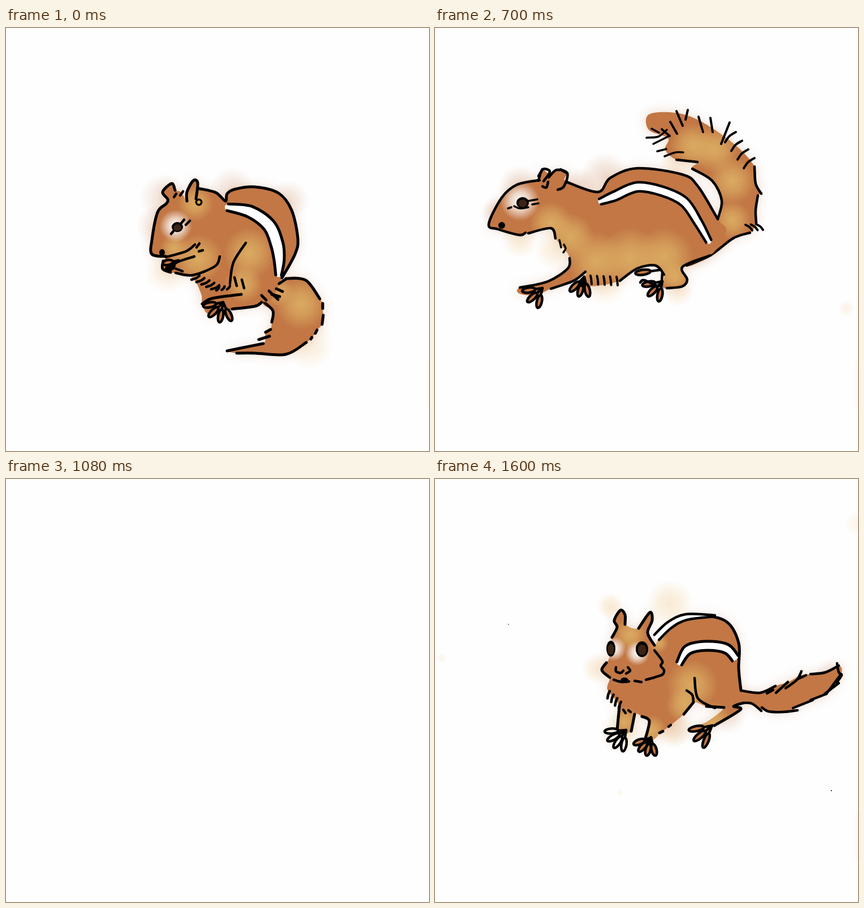
Recreate the animation shown at these times as an HTML page with a canvas. Size 748 by 748 pixels, loop 1.8 s.

```html
<!DOCTYPE html>
<html lang="en">
<head>
<meta charset="utf-8">
<title>Chipmunk</title>
<style>
html, body { margin: 0; width: 100%; height: 100%; overflow: hidden; background: #fefefe; }
canvas { display: block; width: 100vw; height: 100vh; }
</style>
</head>
<body>
<canvas id="stage" width="748" height="748"></canvas>
<script>
const ctx = document.getElementById('stage').getContext('2d');
const FUR = '194,119,69', TAN = '221,176,100', CREAM = '244,214,170', WHITE = '255,255,255';
const PALE = '#fbf0e2';

const points = s => s.trim().split(/\s+/).map(p => p.split(',').map(Number));

// Smooth curve through every point
function spline(p, closed) {
  const n = p.length, path = new Path2D();
  const at = i => closed ? p[(i + n) % n] : p[Math.max(0, Math.min(n - 1, i))];
  path.moveTo(...p[0]);
  for (let i = 0; i < (closed ? n : n - 1); i++) {
    const [a, b, c, d] = [at(i - 1), at(i), at(i + 1), at(i + 2)];
    path.bezierCurveTo(b[0] + (c[0] - a[0]) / 6, b[1] + (c[1] - a[1]) / 6,
      c[0] - (d[0] - b[0]) / 6, c[1] - (d[1] - b[1]) / 6, c[0], c[1]);
  }
  return path;
}

function pen(width) {
  ctx.lineWidth = width;
  ctx.strokeStyle = '#000';
}

function ink(width, ...strokes) {
  pen(width);
  for (const s of strokes) ctx.stroke(spline(points(s)));
}

// Soft airbrush spots: x,y,radius
function glow(rgb, alpha, spots) {
  for (const [x, y, r] of points(spots)) {
    const g = ctx.createRadialGradient(x, y, 0, x, y, r);
    g.addColorStop(0, `rgba(${rgb},${alpha})`);
    g.addColorStop(.45, `rgba(${rgb},${alpha * .68})`);
    g.addColorStop(1, `rgba(${rgb},0)`);
    ctx.fillStyle = g;
    ctx.fillRect(x - r, y - r, 2 * r, 2 * r);
  }
}

// Furry shape; its outline is inked along each part between bars
function shape(width, outline, tan, white) {
  const path = spline(points(outline.replaceAll('|', ' ')), true);
  ctx.save();
  ctx.fillStyle = `rgb(${FUR})`;
  ctx.shadowColor = `rgba(${FUR},.3)`;
  ctx.shadowBlur = 20;
  ctx.fill(path);
  ctx.restore();
  ctx.save();
  ctx.clip(path);
  if (tan) glow(TAN, .9, tan);
  if (white) glow(WHITE, 1, white);
  ctx.restore();
  ink(width, ...outline.split('|'));
}

// White band along a centre line: x,y,half width
function stripe(width, centre) {
  const p = points(centre), sides = [[], []];
  p.forEach(([x, y, w], i) => {
    const a = p[Math.max(0, i - 1)], b = p[Math.min(p.length - 1, i + 1)];
    const t = Math.atan2(b[1] - a[1], b[0] - a[0]);
    sides[0].push([x + w * Math.sin(t), y - w * Math.cos(t)]);
    sides[1].push([x - w * Math.sin(t), y + w * Math.cos(t)]);
  });
  ctx.fillStyle = '#fff';
  ctx.fill(spline([...sides[0], ...sides[1].slice().reverse()], true));
  pen(width);
  for (const s of sides) ctx.stroke(spline(s));
}

// Fan of toe loops
function paw(x, y, angle, len, n, spread, fill = `rgb(${FUR})`) {
  pen(4.5);
  ctx.fillStyle = fill;
  for (let i = 0; i < n; i++) {
    const a = angle + (i - (n - 1) / 2) * spread;
    ctx.beginPath();
    ctx.ellipse(x + Math.cos(a) * len * .68, y + Math.sin(a) * len * .68, len * .32, 4.5, a, 0, 7);
    ctx.fill();
    ctx.moveTo(x, y);
    ctx.lineTo(x + Math.cos(a) * len * .36, y + Math.sin(a) * len * .36);
    ctx.stroke();
  }
}

// Row of n hairs from (x0,y0) to (x1,y1), each reaching by (dx,dy)
function hairs(width, n, x0, y0, x1, y1, dx, dy) {
  pen(width);
  for (let i = 0; i < n; i++) {
    const k = i / (n - 1), x = x0 + (x1 - x0) * k, y = y0 + (y1 - y0) * k;
    ctx.stroke(spline([[x, y], [x + dx * .6, y + dy * .4], [x + dx, y + dy]]));
  }
}

function dot(x, y, rx, ry = rx, color = '#000') {
  ctx.fillStyle = color;
  ctx.beginPath();
  ctx.ellipse(x, y, rx, ry, 0, 0, 7);
  ctx.fill();
}

function eye(x, y, rx, ry) {
  dot(x, y, rx, ry);
  dot(x, y + 1, rx * .68, ry * .68, '#3b2415');
}

function smudge() {
  for (let y = 596; y < 680; y += 12) glow(CREAM, .14, `749,${y},10`);
}

function nibble() {
  glow(FUR, .2, '278,300,42 268,350,38 400,285,40 500,305,36');
  glow(CREAM, .4, '285,430,40 535,560,45');
  shape(5, `495,443 530,446 555,479 | 560,487 560,496 | 561,508 559,524 | 550,534 547,540 | 541,547 539,550
    | 531,556 495,577 440,575 408,575 | 391,571 415,566 455,558 | 459,538 468,533 | 470,520 472,500 455,484`,
    '522,488,46 480,465,28');
  shape(5, `299,287 293,275 277,290 286,303 283,311 268,326 258,375 258,400 283,404 | 278,412 277,426 291,432
    | 328,440 | 345,470 | 347,488 | 358,506 | 390,506 | 400,497 440,492 452,485 | 470,480
    | 488,442 511,400 516,372 505,322 482,292 440,281 405,285 391,293 388,306 371,291 342,284
    | 336,302 339,274 331,270 320,290 320,306 | 309,290`,
    '335,310,32 340,408,44 430,398,46 298,390,26 420,452,34', '300,350,29');
  stripe(5, '392,317,6 432,325,10 465,349,11 479,382,11 483,410,9 482,437,5');
  paw(305, 411, 2.7, 28, 2, .5);
  paw(384, 485, 2.05, 36, 4, .6);
  ink(4.5, '301,293 297,299', '313,289 308,296', '283,405 318,395 334,383', '333,404 303,414 286,427', '296,424 312,430',
    '300,433 330,437 370,421 378,404', '310,345 315,339', '318,348 325,341', '292,364 297,358', '337,388 342,381', '341,395 348,393',
    '424,380 402,415 396,452', '404,441 408,456', '417,445 421,460');
  hairs(4.5, 5, 328, 445, 363, 462, 14, -7);
  hairs(4.5, 3, 372, 464, 391, 462, 5, -6);
  ink(5, '416,471 365,478 347,488', '452,473 460,481', '465,465 481,480', '470,471 484,475', '478,461 489,466', '483,452 495,444', '447,551 466,545');
  dot(276, 397, 5, 6);
  eye(303, 352, 10, 9);
  dot(341, 308, 6.5);
  dot(341, 308, 3, 3, '#d7a53c');
  smudge();
}

function sitUp() {
  glow(FUR, .22, '255,300,40 235,322,26 300,262,36 385,265,32 515,330,34 500,540,40');
  glow(CREAM, .4, '325,390,52 345,440,32 400,550,32');
  shape(5, `490,454 515,442 536,449 | 544,455 550,480 522,524 | 513,531 495,543 458,545 | 446,547 420,545 395,540
    | 361,544 378,533 395,527 | 441,514 | 454,493 466,480 458,462 438,459`);
  shape(5.5, `326,262 290,272 262,294 240,323 246,347 272,353 300,357 | 320,370 | 336,385 | 338,402 | 325,420
    | 338,440 360,452 390,482 408,468 438,459 | 464,466
    | 490,455 514,405 521,345 508,305 482,286 455,280 425,284 402,293 366,265 | 368,243 345,245 | 328,248 326,258`,
    '345,350,52 385,300,34 402,385,46 405,435,42 335,330,36', '295,302,31 322,303,22');
  stripe(5, '403,293,2 432,313,8 452,340,9 454,385,8 451,420,7 447,445,6');
  stripe(5, '485,289,3 504,322,10 512,360,9 505,405,8 485,455,5');
  paw(352, 414, 2.95, 38, 3, .42);
  ink(5, '340,275 362,266 372,248 350,250 334,274', '324,262 322,250 340,245 370,245', '329,272 337,257', '329,260 337,249',
    '340,391 342,402 360,417 354,423', '356,424 361,432 370,432', '357,434 345,431 338,440', '408,331 382,360 367,395 380,456',
    '377,528 400,522 425,519', '388,542 396,533', '415,512 441,517', '432,505 456,507', '448,505 466,496');
  ink(4.5, '276,305 283,305', '305,299 311,302', '328,293 320,293 322,298 329,300', '304,361 318,361', '313,370 321,364', '327,379 335,377', '335,383 339,388',
    '379,347 389,345', '371,354 378,358 385,356');
  hairs(4.5, 3, 361, 367, 361, 388, 12, -4);
  dot(282, 352, 6, 5);
  eye(294, 301, 13, 11);
  dot(295, 297, 2, 2, '#866');
  dot(610, 357, 1);
  dot(669, 485, 1);
  smudge();
}

function crouch() {
  glow(FUR, .24, '300,262,42 150,280,38 108,325,26 255,280,34');
  glow(CREAM, .45, '150,375,32 215,390,40 430,465,28 430,240,34 300,450,40');
  glow(CREAM, .3, '728,496,15');
  shape(4.5, `500,338 507,305 490,270 455,249 | 464,237 427,233 | 407,215 | 412,195 | 378,180 | 378,153 | 425,150
    | 470,165 | 530,206 | 565,245 567,275 577,293 | 571,296 567,322 568,345 | 557,362 527,372 487,402 445,420 | 450,370`,
    '455,208,40 495,215,42 525,270,42 525,340,34');
  shape(4.5, `185,269 145,277 118,300 95,347 112,356 149,366 160,362 | 165,363 205,354 213,372 | 230,392
    | 238,407 235,425 200,448 150,459 | 150,470 | 180,472 | 205,461 245,447 266,431 | 270,456
    | 327,447 358,425 390,420 405,436 | 402,458 | 410,460 437,457 446,445 438,422 487,402 | 515,360
    | 500,338 465,280 437,259 358,248 310,265 288,290 232,272 | 234,257 222,250 | 203,258 | 190,250 183,262`,
    '205,345,38 240,370,42 285,412,52 345,408,56 405,405,52 425,440,28', '150,306,35');
  stripe(4.5, '292,307,5 318,297,8 357,281,8 400,288,8 440,307,8 465,343,7 484,377,5');
  paw(190, 460, 2.4, 36, 3, .6);
  paw(264, 440, 1.85, 36, 3, .5);
  paw(402, 448, 2.35, 36, 3, .6);
  paw(396, 428, 3, 42, 1, 0);
  ink(4.5, '217,286 228,280 234,257 215,251 201,264', '183,270 190,250 203,254 192,271', '190,280 197,282 200,272', '402,434 397,456 370,446 363,450');
  ink(3.5, '129,319 135,317', '140,315 150,319 165,317', '164,306 181,303', '172,312 183,310', '220,375 223,388', '228,383 231,390 227,397');
  hairs(4, 5, 275, 438, 321, 440, 2, 15);
  ink(4, '427,147 438,173', '447,145 443,162', '466,157 474,184', '487,159 491,184', '521,167 506,205', '416,166 428,187', '401,179 415,191');
  hairs(4, 4, 532, 184, 565, 230, -19, 18);
  hairs(4, 3, 568, 347, 549, 348, 12, 10);
  ink(3.5, '383,178 396,185', '374,194 395,192 410,180', '386,205 412,192', '393,218 409,214', '406,227 425,220 439,220');
  dot(118, 349, 6);
  dot(262, 453, 6);
  eye(155, 309, 11, 10);
  smudge();
}

function leap() {
  glow(CREAM, .4, '300,240,36 350,236,34 420,215,40 50,385,36 100,405,40 150,450,28');
  glow(FUR, .13, '215,245,28 110,243,26');
  glow(CREAM, .25, '748,78,24 327,555,6');
  shape(4.5, '205,392 219,425 213,446 204,440 196,405');
  shape(5, `-6,246 | 12,243 62,235 110,248 170,272 235,257 | 260,256 290,247 334,246 | 346,244 350,244
    | 365,243 400,246 440,242 453,231 | 466,238 | 437,270 | 407,290 387,293 | 391,297 340,291 305,298 | 291,300 274,297
    | 266,296 232,299 212,313 206,348 216,350 225,345 232,376 257,414 | 262,425 | 240,430
    | 222,402 206,380 197,405 155,424 115,408 85,371 | 86,377 40,370 2,364 | -6,364`,
    '140,380,54 100,360,36 40,352,34 300,262,34 345,262,36 390,262,30');
  stripe(5, '-5,265,7 60,255,7 100,263,7 145,284,5 188,288,3');
  paw(240, 412, 1.2, 32, 3, .42);
  ink(5, '226,267 249,255', '466,238 445,254 408,266', '437,270 395,283 367,283', '80,364 91,367');
  ink(3.5, '68,320 78,319', '67,333 89,333', '76,343 99,343', '75,349 93,353');
  dot(209, 436, 7, 11);
  smudge();
}

function run() {
  glow(FUR, .22, '505,245,36 610,245,36 380,260,32 675,270,32 690,385,30');
  glow(CREAM, .5, '400,340,28 435,210,28 470,400,38 610,415,36');
  glow(CREAM, .2, '705,612,30 735,612,30 748,78,24 327,555,6');
  shape(6, '752,261 728,267 704,288 | 699,299 722,325 | 720,317 738,326 | 737,319 752,323', '735,288,30');
  shape(6, `452,238 408,243 367,280 352,295 362,307 370,300 | 366,305 375,321 398,314 | 386,325 429,330 433,350 446,372
    | 465,385 | 486,400 520,397 558,360 | 570,366 | 580,373 615,388 640,390 | 632,408
    | 656,404 670,392 699,370 684,360 700,335 687,296 | 706,287 670,272 625,253 | 612,249 609,248
    | 600,243 580,235 530,245 498,268 480,264 | 481,242 465,230 456,242`,
    '550,345,44 600,342,50 650,350,42 525,370,34 400,312,34', '405,278,24 430,275,26 447,268,14');
  stripe(5, '498,281,6 530,270,6 570,263,8 620,275,8 676,299,6');
  paw(436, 390, 2.65, 42, 3, .5, PALE);
  paw(484, 392, 2.05, 32, 3, .5, PALE);
  paw(632, 407, 2.4, 44, 3, .6, PALE);
  ink(5, '480,264 471,266 475,276', '452,257 456,242', '448,274 449,275', '401,279 406,283', '429,281 435,275', '447,363 460,380 486,388', '455,372 466,384',
    '400,392 440,388 486,388', '558,360 559,371', '545,370 552,374', '574,360 569,374', '641,392 630,408', '640,410 655,407 660,414 642,417', '652,374 674,369');
  hairs(5, 4, 616, 377, 645, 375, 12, 8);
  dot(427, 234, 7, 5);
  eye(418, 279, 12, 10);
  dot(507, 136, 1);
  smudge();
}

function lookUp() {
  glow(CREAM, .5, '415,220,42 310,225,24 288,335,28 420,440,36 330,450,40');
  glow(FUR, .15, '425,440,34 700,345,28 520,420,32');
  glow(CREAM, .25, '748,78,24 327,555,6 12,316,9');
  shape(4.5, `541,374 575,378 602,366 | 625,359 | 645,348 | 664,345 690,342 714,330 | 718,345 692,380 | 668,391 633,405
    | 641,409 614,412 590,411 578,404 | 577,410 560,397 541,396 | 530,386`);
  shape(5, `313,280 322,262 317,250 328,232 336,240 336,257 | 360,264 380,236 384,250 376,272 388,294
    | 398,280 428,254 470,242 515,252 537,290 537,335 541,374 | 545,396 528,402 540,408 494,436 | 478,450 | 450,440 | 480,430
    | 511,404 480,402 | 457,395 440,416 | 403,446 397,449 | 390,458 | 368,472 | 372,459 379,428 366,420
    | 353,416 347,446 | 322,445 326,402 | 305,373 | 309,351 295,338 303,325 | 308,316`,
    '345,275,30 455,365,46 335,430,28 383,445,28 490,430,38 440,400,32 395,290,18', '316,300,22 358,308,22');
  shape(4.5, '388,303 402,322 399,330 405,338 402,346 390,350 | 375,330');
  stripe(4.5, '392,280,6 415,258,6 445,244,5 495,242,1');
  stripe(5, '432,326,5 447,302,8 480,295,8 515,300,8 531,317,7');
  paw(338, 444, 2.4, 38, 4, .45, PALE);
  paw(382, 457, 2.05, 33, 4, .48);
  paw(490, 436, 2.45, 42, 3, .5);
  ink(4.5, '320,333 320,340 328,343 333,339', '341,333 345,339 338,344', '316,355 330,359 343,358', '353,357 365,359', '373,355 388,351',
    '333,408 337,414', '342,409 346,412', '413,438 417,435', '457,395 455,382 445,374', '459,352 465,388 495,405');
  hairs(4.5, 4, 309, 375, 329, 394, -4, 13);
  ink(4.5, '587,379 598,373', '603,378 624,359', '620,370 640,355 648,340', '643,353 656,347', '711,326 714,342 719,347 710,360', '664,391 692,380', '689,380 714,361');
  dot(335, 356, 7, 5);
  eye(311, 300, 8, 14);
  eye(366, 301, 11, 14);
  dot(130, 257, .8);
  dot(701, 551, 1);
  smudge();
}

const LOOP = 1800;
const scenes = [[200, nibble], [700, sitUp], [800, crouch], [900, leap], [1200, () => {}], [1300, run], [LOOP, lookUp]];
const start = performance.now();
let shown;

function frame() {
  const t = (performance.now() - start) % LOOP;
  const scene = scenes.find(([end]) => t < end)[1];
  if (scene !== shown) {
    shown = scene;
    ctx.fillStyle = '#fefefe';
    ctx.fillRect(0, 0, 748, 748);
    scene();
  }
  requestAnimationFrame(frame);
}

ctx.lineCap = ctx.lineJoin = 'round';
frame();
</script>
</body>
</html>
```
